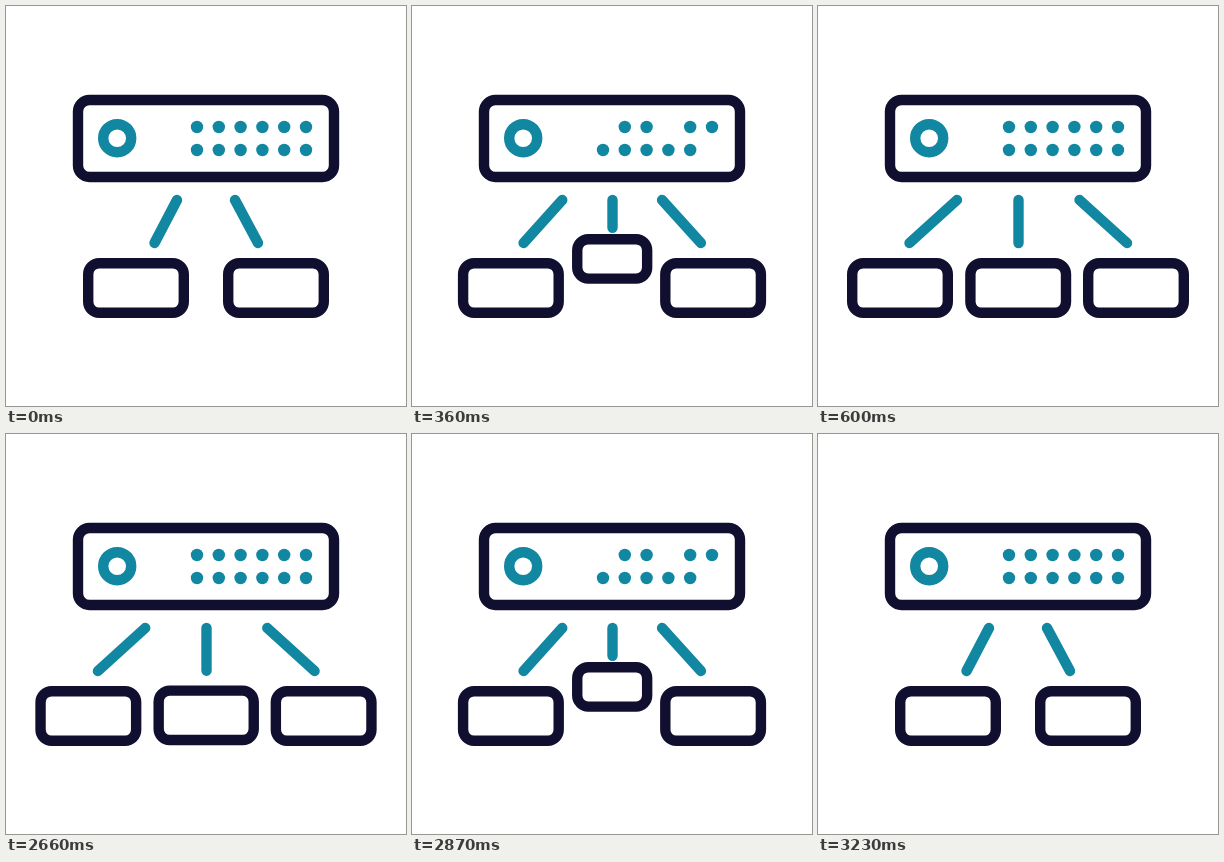
These frames come from a looping animation (400 by 400 pixels, 4260 ms). An HTML page:

```html
<!DOCTYPE html>
<html lang="en">
<head>
<meta charset="utf-8">
<title>Server and nodes</title>
<style>
  html, body { margin: 0; width: 100%; height: 100%; overflow: hidden; background: #fff; }
  svg { display: block; width: 100%; height: 100%; }
  .dark { fill: #fff; stroke: #110f30; stroke-width: 10.4; }
  .teal { fill: none; stroke: #1187a2; stroke-width: 10.4; stroke-linecap: round; }
  #dots { fill: #1187a2; }
</style>
</head>
<body>
<svg viewBox="0 0 400 400">
  <g class="teal">
    <line id="leftLink" y1="194" y2="237"/>
    <line id="middleLink" x1="200.5" x2="200.5" y1="194"/>
    <line id="rightLink" y1="194" y2="237"/>
  </g>
  <g class="dark">
    <rect x="72" y="94" width="256" height="77" rx="11.5"/>
    <rect id="leftNode"/>
    <rect id="rightNode"/>
    <rect id="middleNode"/>
  </g>
  <circle class="teal" cx="111.2" cy="132.2" r="14"/>
  <g id="dots"></g>
</svg>
<script>
const STEP = 30, STEPS = 20, CLOSE_START = 2630, LOOP = 4260;
const STROKE = 10.4;
const byId = id => document.getElementById(id);
const mix = (a, b, p) => a + (b - a) * p;

function set(element, attributes) {
  for (const name in attributes) element.setAttribute(name, attributes[name]);
}

// Sizes are outer sizes, stroke included.
function placeNode(id, cx, cy, outerWidth, outerHeight) {
  const width = Math.max(0, outerWidth - STROKE);
  const height = Math.max(0, outerHeight - STROKE);
  set(byId(id), { x: cx - width / 2, y: cy - height / 2, width, height, rx: Math.min(11, width / 2, height / 2) });
}

// Steps during which a lamp is off, keyed by row and column.
const offSteps = { "0,0": [1, 14], "1,5": [1, 14], "0,3": [10, 17] };
const lamps = [];
for (let row = 0; row < 2; row++) {
  for (let column = 0; column < 6; column++) {
    const circle = document.createElementNS("http://www.w3.org/2000/svg", "circle");
    set(circle, { cx: 191 + column * 21.8, cy: 121 + row * 23, r: 6.2 });
    byId("dots").append(circle);
    lamps.push({ circle, off: offSteps[row + "," + column] });
  }
}

function stepAt(time) {
  const step = time < CLOSE_START
    ? Math.floor(time / STEP)
    : STEPS - Math.floor((time - CLOSE_START) / STEP);
  return Math.max(0, Math.min(STEPS, step));
}

function draw(time) {
  const step = stepAt(time);
  const t = step / STEPS;
  const p = t * t * (3 - 2 * t);

  placeNode("leftNode", mix(130, 82, p), 282, 106, 60);
  placeNode("rightNode", mix(270, 318, p), 282, 106, 60);
  const grow = Math.min(1, p * 10);
  placeNode("middleNode", 200.2, 209 + 58 * p + 15 * p * p, mix(33, 106, p) * grow, mix(31, 60, p) * grow);

  set(byId("leftLink"), { x1: mix(171, 139, p), x2: mix(148.5, 91.5, p) });
  set(byId("rightLink"), { x1: mix(229, 261.5, p), x2: mix(252, 309, p) });
  set(byId("middleLink"), { y2: mix(194, 237, p) });

  const middle = step > 0 ? "visible" : "hidden";
  set(byId("middleNode"), { visibility: middle });
  set(byId("middleLink"), { visibility: middle });

  for (const { circle, off } of lamps) {
    const isOff = off && step >= off[0] && step <= off[1];
    set(circle, { visibility: isOff ? "hidden" : "visible" });
  }
}

const start = performance.now();
function tick() {
  draw((performance.now() - start) % LOOP);
  requestAnimationFrame(tick);
}
tick();
</script>
</body>
</html>
```
